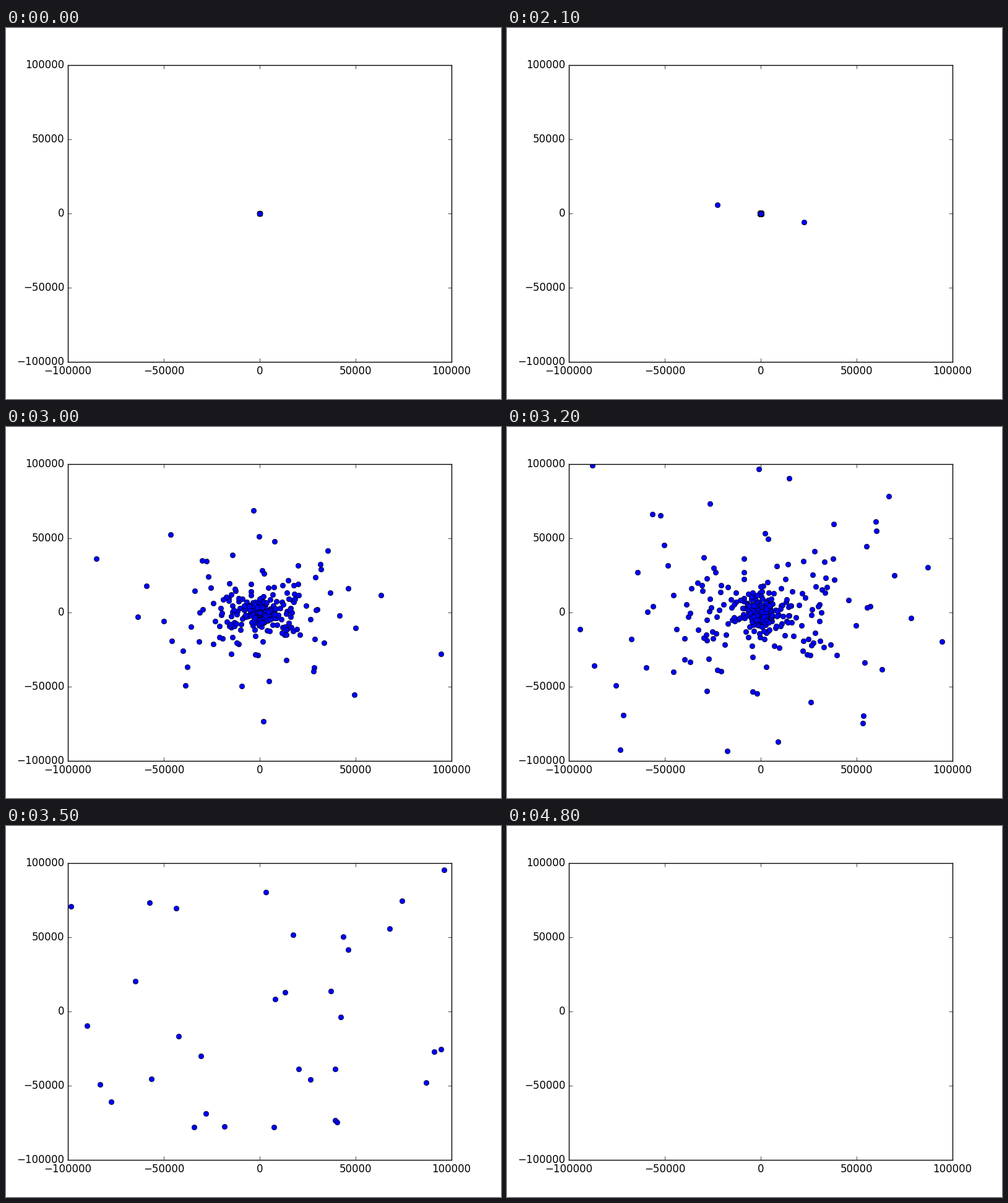
Animation of 800 by 600 pixels, one loop 4.95 s. Source, as a matplotlib script:

```python
import numpy as np
import matplotlib.pyplot as plt
from matplotlib.animation import FuncAnimation

plt.style.use("classic")
plt.rcParams["ytick.alignment"] = "center"

STEP = 50          # ms per drawn frame
FRAMES = 99
LIMIT = 100000
START = 2000       # the cluster rests until here

# Radius in the cloud is log-normal; its median and spread follow these keys.
KEYS = [2000, 2500, 2600, 3000, 3200, 3500]
MEDIAN = np.log([90, 600, 1200, 9000, 17000, 2e6])
SPREAD = [0.5, 0.9, 1.1, 1.3, 1.3, 0.7]

rng = np.random.default_rng(11)


def mirrored(points):
    return np.vstack([points, -points])


# Bodies leave in nearly opposite pairs.
half = rng.normal(size=155)
half = half[np.abs(half) < 2.2]
turn = rng.uniform(0, 2 * np.pi, half.size)
z = np.append(half, half + rng.normal(0, 0.1, half.size))
angle = np.append(turn, turn + np.pi + rng.normal(0, 0.1, half.size))
heading = np.column_stack([np.cos(angle), np.sin(angle)])

first = mirrored(np.array([(98500, -25500)]))
early = mirrored(np.array([(21700, -59000), (22200, -31700), (6800, -31700),
                           (36700, 8200), (26000, 5000)]))
late = rng.uniform(-LIMIT, LIMIT, (33, 2))

# (points at the pose, launch ms, pose ms, acceleration power)
WAVES = [(first, 1950, 2600, 1), (early, 2430, 2600, 3), (late, 3100, 3500, 2)]


def cloud(t):
    if t < START:
        return 0 * heading
    radius = np.exp(np.interp(t, KEYS, MEDIAN) + np.interp(t, KEYS, SPREAD) * z)
    return heading * radius[:, None]


def wave(points, launch, pose, power, t):
    if t < START:
        return 0 * points
    f = (max(t - launch, 0) / (pose - launch)) ** power
    unit = points / np.linalg.norm(points, axis=1, keepdims=True)
    return points * f + unit * 30000 * max(f - 1, 0)


fig = plt.figure(figsize=(8, 6), dpi=100, facecolor="white")
ax = fig.add_axes([0.125, 0.1, 0.775, 0.8])
ax.set_xlim(-LIMIT, LIMIT)
ax.set_ylim(-LIMIT, LIMIT)
ticks = np.arange(-LIMIT, LIMIT + 1, 50000)
ax.set_xticks(ticks)
ax.set_yticks(ticks)
dots, = ax.plot([], [], "bo")


def update(i):
    t = i * STEP // 100 * 100      # the picture moves on every 100 ms
    xy = np.vstack([cloud(t)] + [wave(*w, t) for w in WAVES])
    dots.set_data(xy[:, 0], xy[:, 1])
    return dots,


anim = FuncAnimation(fig, update, frames=FRAMES, interval=STEP, repeat=True)
plt.show()
```
